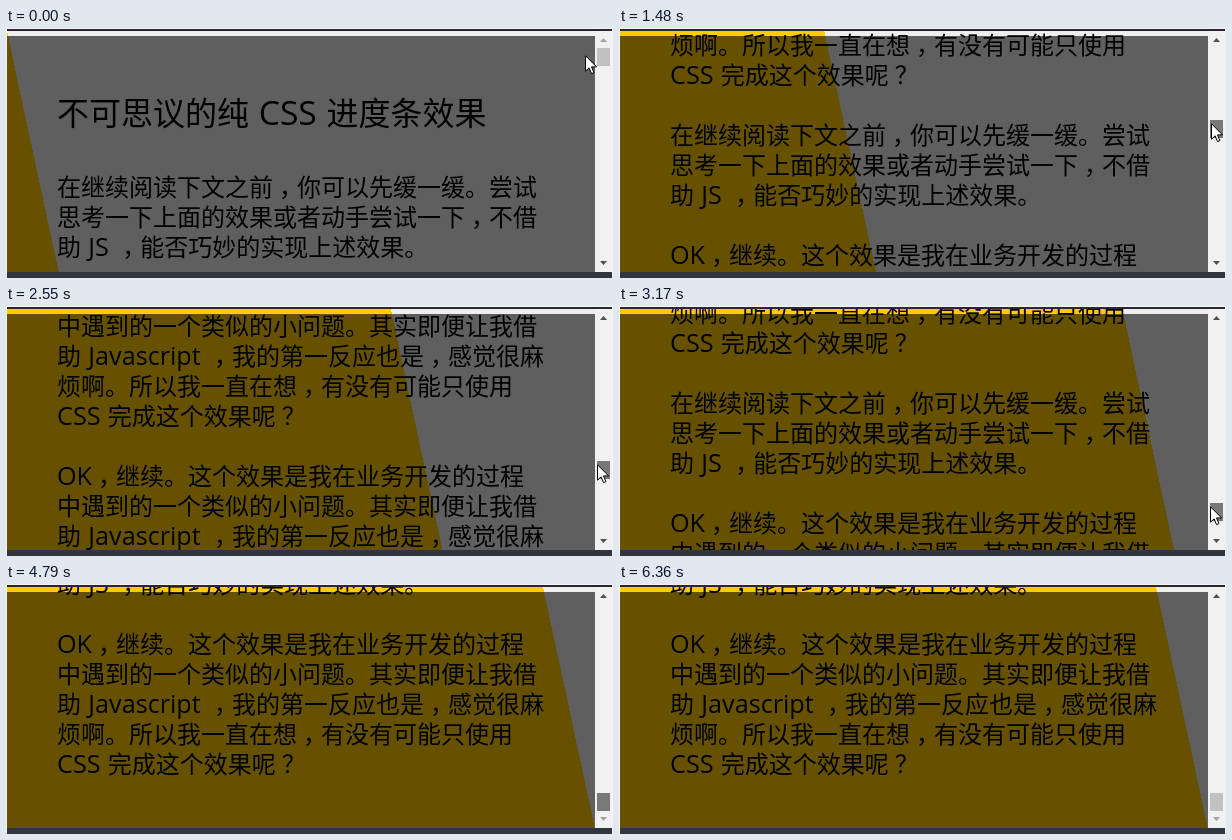
These frames come from a looping animation (607x250 px, 6.81 s). An HTML page:

```html
<!DOCTYPE html>
<html lang="zh-CN">
<head>
<meta charset="utf-8">
<title>CSS 进度条</title>
<style>
  html, body { margin: 0; width: 100%; height: 100%; overflow: hidden; background: #f4f4f4; }
  #stage { position: relative; width: 607px; height: 250px; overflow: hidden; }
  #stage div, #stage svg { position: absolute; }
  .top { left: 1px; top: 1px; width: 605px; height: 2px; background: #2b2636; }
  .bottom { left: 1px; top: 244px; width: 605px; height: 6px; background: #30363f; }
  .view { left: 1px; top: 3px; width: 588px; height: 241px; overflow: hidden; }
  #page {
    left: 0; top: 0; width: 588px; height: 2741px; box-sizing: border-box; padding: 60px 0 0 50px;
    background: linear-gradient(to right top, #fc0 50%, #eee 50%);
    font: 350 24px/30px "Noto Sans CJK SC", "Noto Sans CJK", "Noto Sans CJK JP", sans-serif;
    color: #000; white-space: nowrap;
  }
  h1 { margin: 0 0 40px; font-size: 32px; line-height: 40px; font-weight: 350; }
  p { margin: 0 0 30px; }
  .latin { font: 400 1.05em/0 "Open Sans", "Noto Sans", sans-serif; word-spacing: .03em; }
  .mark { position: relative; left: .25em; }
  .shade { left: 0; top: 5px; width: 588px; height: 236px; background: rgba(0, 0, 0, .6); }
  .bar { left: 589px; top: 3px; width: 17px; height: 241px; background: #f1f1f1; }
  #thumb { left: 2px; top: 17px; width: 13px; height: 18px; }
  .arrow { left: 5px; width: 7px; height: 4px; }
  #up { top: 7px; clip-path: polygon(50% 0, 100% 100%, 0 100%); }
  #down { top: 230px; clip-path: polygon(0 0, 100% 0, 50% 100%); }
  #mouse { left: 0; top: 0; }
</style>
</head>
<body>
<div id="stage">
  <div class="view">
    <div id="page"></div>
    <div class="shade"></div>
  </div>
  <div class="bar">
    <div id="up" class="arrow"></div>
    <div id="thumb"></div>
    <div id="down" class="arrow"></div>
  </div>
  <div class="top"></div>
  <div class="bottom"></div>
  <svg id="mouse" width="13" height="20" viewBox="0 0 13 20">
    <path d="M.5 .8V16.2L4.1 12.8L6.5 18.6L8.9 17.6L6.5 11.9H11.6Z" fill="#fff" stroke="#000"/>
  </svg>
</div>
<script>
const LOOP = 6810, STEP = 77, OFFSET = 8;
const MAX_SCROLL = 2499, TRAVEL = 189, GRAB = 23, BELOW = 254;
const ARRIVE = 230, PRESS = 390, RELEASE = 6260;

const title = '不可思议的纯 CSS 进度条效果';
const paragraphs = {
  A: ['在继续阅读下文之前，你可以先缓一缓。尝试',
      '思考一下上面的效果或者动手尝试一下，不借',
      '助 JS ，能否巧妙的实现上述效果。'],
  B: ['OK，继续。这个效果是我在业务开发的过程',
      '中遇到的一个类似的小问题。其实即便让我借',
      '助 Javascript ，我的第一反应也是，感觉很麻',
      '烦啊。所以我一直在想，有没有可能只使用',
      'CSS 完成这个效果呢？']
};

// Pointer height on the way down: time, y
const descent = [
  [0, 27], [ARRIVE, GRAB], [PRESS, GRAB], [624, 34.8],
  [1471, 95], [2010, 121.8], [3165, 200.1], [3700, BELOW]
];

const $ = id => document.getElementById(id);
const page = $('page'), thumb = $('thumb'), mouse = $('mouse'), up = $('up'), down = $('down');

const clamp = v => Math.min(1, Math.max(0, v));
const lerp = (a, b, f) => a + (b - a) * f;

function addText(tag, lines) {
  const el = document.createElement(tag);
  el.innerHTML = lines.map(line => line
    .replace(/[，？]|[A-Za-z ]+/g, s =>
      `<span class="${/[，？]/.test(s) ? 'mark' : 'latin'}">${s}</span>`)
  ).join('<br>');
  page.append(el);
}

addText('h1', [title]);
for (const key of 'ABABABABABABBABAB') addText('p', paragraphs[key]);

// Flat-topped pull back up around a moment
const pull = (t, middle, half) => Math.max(0, 1 - ((t - middle) / half) ** 4);

function pointerY(t) {
  const i = descent.findIndex(k => k[0] > t);
  if (i < 0) return BELOW - 56 * (pull(t, 4405, 385) + pull(t, 5600, 510));
  const [t0, y0] = descent[i - 1], [t1, y1] = descent[i];
  return lerp(y0, y1, (t - t0) / (t1 - t0));
}

function pointerX(t) {
  const drift = 6 * Math.exp(-Math.max(0, t - 624) / 500);
  return lerp(579, 591 + drift, clamp(t / ARRIVE));
}

const move = (el, x, y) => { el.style.transform = `translate(${Math.round(x)}px, ${Math.round(y)}px)`; };
const paint = (el, color) => { el.style.background = color; };

function draw(now) {
  // The picture refreshes at a fixed rate
  const t = Math.max(0, Math.floor((now % LOOP - OFFSET) / STEP) * STEP + OFFSET);
  const x = pointerX(t), y = pointerY(t);
  const share = t < PRESS ? 0 : clamp((y - GRAB) / TRAVEL);
  const pressed = t >= PRESS && t < RELEASE;
  const hover = t < PRESS && x >= 591;

  move(page, 0, -share * MAX_SCROLL);
  move(thumb, 0, share * TRAVEL);
  move(mouse, t > OFFSET ? x : 579, y);
  paint(thumb, pressed ? '#787878' : hover ? '#a8a8a8' : '#c1c1c1');
  paint(up, share > 0 ? '#505050' : '#a3a3a3');
  paint(down, share < 1 ? '#505050' : '#a3a3a3');
}

const start = performance.now();
function tick() {
  draw(performance.now() - start);
  requestAnimationFrame(tick);
}
tick();
</script>
</body>
</html>
```
